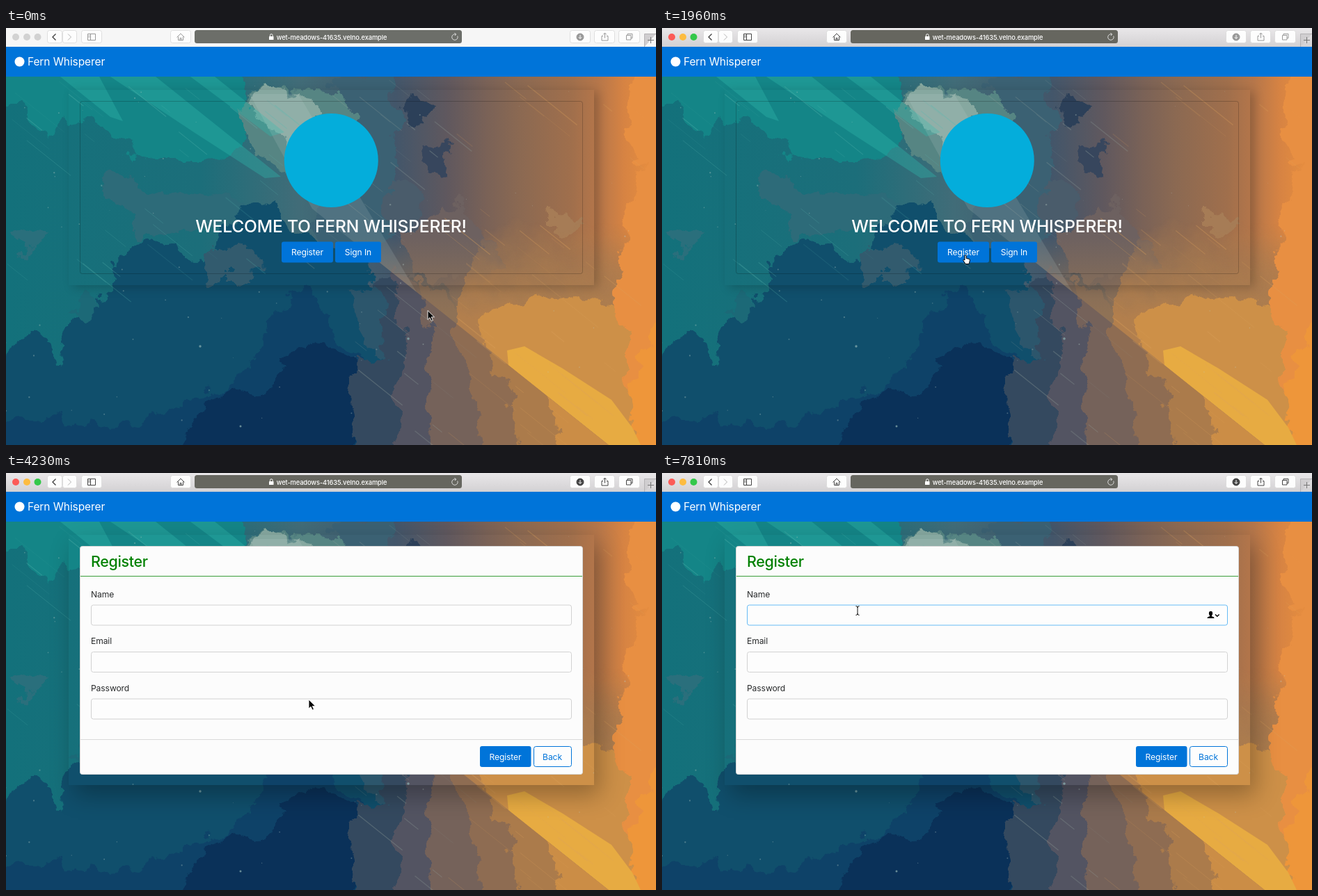
An HTML page for the animation above (8000 ms loop, 934x600 px).

```html
<!DOCTYPE html>
<html lang="en">
<head>
<meta charset="utf-8">
<title>Register</title>
<style>
html, body { margin: 0; width: 100%; height: 100%; overflow: hidden; background: #14707b; }
svg { position: absolute; left: 0; top: 0; width: 934px; height: 600px; }
#scene { will-change: transform; }
#panel { position: absolute; left: 90px; top: 89px; width: 755px; height: 281px; box-shadow: 6px 3px 14px rgba(0, 0, 0, .2); }
#panel.tall { height: 360px; box-shadow: 8px 15px 32px rgba(0, 0, 0, .28); }
text { font: 12.1px Inter, sans-serif; letter-spacing: -.1px; }
.mid { text-anchor: middle; }
.white { fill: #fff; }
.blue { fill: #0074d9; }
.field { fill: #fdfdfd; stroke: #d2d2d2; }
.key { fill: #fdfdfd; stroke: #d8d8d8; stroke-width: .8; }
.ink { fill: none; stroke: currentColor; stroke-width: 1; }
</style>
</head>
<body>
<svg id="scene" viewBox="0 0 934 600">
  <defs>
    <linearGradient id="sky">
      <stop offset="0" stop-color="#13717b"/>
      <stop offset=".3" stop-color="#1c6e7a"/>
      <stop offset=".45" stop-color="#416c78"/>
      <stop offset=".6" stop-color="#43566a"/>
      <stop offset=".68" stop-color="#60585e"/>
      <stop offset=".74" stop-color="#7a6257"/>
      <stop offset=".79" stop-color="#8b6952"/>
      <stop offset=".87" stop-color="#a06f4c"/>
      <stop offset=".91" stop-color="#b5764a"/>
      <stop offset=".95" stop-color="#d68343"/>
      <stop offset="1" stop-color="#ea903e"/>
    </linearGradient>
    <linearGradient id="dusk" gradientUnits="userSpaceOnUse" x1="0" y1="300" x2="0" y2="410">
      <stop offset="0" stop-color="#8f7256" stop-opacity="0"/>
      <stop offset="1" stop-color="#8f7256"/>
    </linearGradient>
    <linearGradient id="sand" gradientUnits="userSpaceOnUse" x1="0" y1="280" x2="0" y2="420">
      <stop offset="0" stop-color="#b27f4d" stop-opacity="0"/>
      <stop offset="1" stop-color="#b27f4d"/>
    </linearGradient>
    <clipPath id="above"><polygon points="490,300 540,340 866,600 990,699 990,20 490,20"/></clipPath>
    <filter id="rough" filterUnits="userSpaceOnUse" x="-40" y="20" width="1014" height="630" color-interpolation-filters="sRGB">
      <feTurbulence type="fractalNoise" baseFrequency=".028" numOctaves="5" seed="4"/>
      <feDisplacementMap in="SourceGraphic" scale="48" xChannelSelector="R" yChannelSelector="G"/>
    </filter>
  </defs>
  <rect width="934" height="600" fill="url(#sky)"/>
  <g filter="url(#rough)">
    <polygon fill="#148587" points="-40,20 350,20 345,110 330,180 280,195 210,195 160,165 120,130 60,150 20,110 -40,110"/>
    <polygon fill="#2a6f7c" points="8,300 30,290 50,305 35,325 15,318"/>
    <polygon fill="#2d6b79" points="135,210 170,205 200,235 260,230 330,240 360,260 330,290 250,290 200,305 180,275 145,240"/>
    <polygon fill="#3b6173" points="470,60 550,65 570,130 550,210 580,250 560,300 480,330 430,290 500,200"/>
    <polygon fill="#568583" points="330,120 345,100 375,86 440,88 490,110 500,160 480,230 430,220 380,190 340,165"/>
    <polygon fill="#86a8a0" points="345,108 375,86 425,92 450,125 412,168 392,155"/>
    <polygon fill="#2c4059" points="568,112 588,100 612,112 606,136 582,138"/>
    <polygon fill="#37465d" points="596,175 620,160 642,180 632,205 604,202"/>
    <polygon fill="#4a5c6b" points="545,240 580,215 600,245 585,290 555,295"/>
    <polygon fill="#6d6160" points="570,300 640,250 680,290 720,345 600,365"/>
    <polygon fill="#a67c56" points="785,268 812,255 830,285 805,302 785,292"/>
    <polygon fill="#104f6c" points="-40,500 10,465 35,440 80,485 95,400 140,410 150,370 165,322 215,305 240,318 300,345 330,255 380,250 420,300 500,330 560,390 600,470 590,640 -40,640"/>
    <polygon fill="#1c6977" points="85,402 110,388 142,397 140,412 100,413"/>
    <polygon fill="#325b6e" points="285,330 340,310 375,335 350,360 295,360"/>
    <polygon fill="#0e4268" points="-40,570 60,560 130,580 180,570 260,540 350,500 365,460 405,385 445,365 465,430 515,490 510,640 -40,640"/>
    <polygon fill="#0a3159" points="220,640 265,560 310,520 370,525 405,470 455,445 500,490 515,540 475,640"/>
    <polygon fill="#2c566c" points="495,370 545,372 590,440 560,480 520,465"/>
    <polygon fill="#34495f" points="500,480 540,470 545,360 600,360 960,640 510,640 495,560"/>
    <polygon fill="#535462" points="555,345 575,470 555,530 575,640 960,640"/>
    <polygon fill="#75625a" points="590,360 615,470 600,540 625,640 960,640"/>
    <polygon fill="#8e6c52" points="640,400 665,500 685,640 960,640"/>
    <polygon fill="#ab7b4b" points="690,440 725,540 740,640 960,640"/>
    <polygon fill="#cb8d46" points="750,490 785,560 800,640 960,640"/>
  </g>
  <g clip-path="url(#above)">
    <rect x="490" y="300" width="444" height="300" fill="url(#dusk)"/>
    <g filter="url(#rough)">
      <polygon fill="url(#sand)" points="640,440 660,385 690,280 990,280 990,640 860,640"/>
      <polygon fill="#cd9048" points="695,490 680,418 730,395 800,385 870,395 960,420 960,640 860,640"/>
      <polygon fill="#e88f42" points="905,20 893,130 910,200 890,270 880,340 868,380 890,430 890,500 920,560 930,640 990,640 990,20"/>
      <polygon fill="#ee963a" points="934,420 915,480 900,540 880,640 990,640 990,400"/>
    </g>
    <polygon fill="#e7ab42" points="720,464 745,458 800,490 870,535 900,575 912,600 866,600 722,485"/>
  </g>
  <g fill="#2fb5aa" opacity=".38">
    <polygon points="78,70 134,70 168,134 150,128"/>
    <polygon points="150,70 215,70 395,214 372,216 270,150"/>
    <polygon points="265,70 300,70 400,150 380,156"/>
  </g>
  <polygon fill="#c9dcd0" opacity=".14" points="350,95 420,95 590,380 540,340 440,260"/>
  <g id="grain"></g>
</svg>

<div id="panel"></div>

<svg viewBox="0 0 934 600">
  <defs>
    <linearGradient id="bar" x2="0" y2="1">
      <stop offset="0" stop-color="#e9e7e9"/>
      <stop offset="1" stop-color="#d3d1d3"/>
    </linearGradient>
  </defs>

  <!-- browser bar -->
  <rect id="top" width="934" height="27"/>
  <g id="lights"><circle cx="14" cy="13" r="5"/><circle cx="30" cy="13" r="5"/><circle cx="45.500" cy="13" r="5"/></g>
  <g id="keys"></g>
  <path d="M917.500 27V8.500H934" fill="#d0ced0" stroke="#b4b2b4"/>
  <path d="M922 17.500h9M926.500 13v9" stroke="#777"/>
  <path d="M71.500 8.500 67 13l4.500 4.500" fill="none" stroke="#444" stroke-width="1.400"/>
  <path d="M89 8.500 93.500 13 89 17.500" fill="none" stroke="#b5b5b5"/>
  <g id="left" class="ink">
    <path d="M117.500 8.500h11v9h-11zM121.500 8.500v9M118.500 11h2M118.500 13h2"/>
    <path d="M245.500 13.500 251 8l5.500 5.500M247.500 12.500v5h7v-5M250 17.500v-3h2v3"/>
  </g>
  <g id="right" class="ink">
    <circle cx="825" cy="13" r="5" fill="currentColor"/>
    <path d="M825 10v5M822.800 13.200 825 15.500l2.200-2.300" style="stroke:#fff"/>
    <path d="M858 11.500h-2v6.500h9v-6.500h-2M860.500 14.500V7.500M858 9.500l2.500-2.500 2.500 2.500"/>
    <path d="M893 10.500V8.500h7v6h-2M891.500 10.500h6.500v6.500h-6.500z"/>
  </g>
  <rect id="address" x="271" y="3" width="384" height="19" rx="3.500"/>
  <rect x="378" y="12" width="6.500" height="5" rx=".6" class="white"/>
  <path d="M379.500 12v-1.500a1.800 1.800 0 0 1 3.600 0V12" fill="none" stroke="#fff"/>
  <text x="468" y="16.500" class="mid white" style="font-size:9.300px;font-weight:500">wet-meadows-41635.velno.example</text>
  <path d="M648.800 11.500a4.200 4.200 0 1 1-2.600-2.400M644.500 7.300l2.400 1.800-2 2" fill="none" stroke="#ddd"/>

  <!-- site header -->
  <rect y="27" width="934" height="43" class="blue"/>
  <circle cx="19.500" cy="48.500" r="7" class="white"/>
  <text x="31" y="54" class="white" style="font-size:15.500px">Fern Whisperer</text>

  <g id="welcome">
    <rect x="106.500" y="105.500" width="722" height="248" rx="3" fill="none" stroke="#000" stroke-opacity=".2"/>
    <circle cx="467.300" cy="190.500" r="67.500" fill="#04addb"/>
    <text x="467" y="293.500" class="mid white" style="font-size:24.600px;font-weight:450;letter-spacing:-.2px">WELCOME TO FERN WHISPERER!</text>
    <rect id="join" x="396" y="307.500" width="74" height="30" rx="3"/>
    <rect x="473" y="307.500" width="66" height="30" rx="3" class="blue"/>
    <text x="433" y="327" class="mid white">Register</text>
    <text x="506" y="327" class="mid white">Sign In</text>
  </g>

  <g id="form">
    <rect x="106.500" y="105.500" width="722" height="328" rx="3" fill="#fcfcfc" stroke="#d6d6d6"/>
    <path d="M107 148.500H828" stroke="#3a9d3a"/>
    <path d="M107 383.500H828" stroke="#d9d9d9"/>
    <text x="122" y="134.500" fill="#008000" style="font-size:21.400px;font-weight:500;letter-spacing:-.3px">Register</text>
    <g fill="#292b2c">
      <text x="122" y="178.500">Name</text>
      <text x="122" y="246">Email</text>
      <text x="122" y="313.500">Password</text>
    </g>
    <rect id="name" class="field" x="122.500" y="190" width="690" height="29" rx="3"/>
    <rect class="field" x="122.500" y="257.500" width="690" height="29" rx="3"/>
    <rect class="field" x="122.500" y="325" width="690" height="29" rx="3"/>
    <rect x="681" y="393" width="73.500" height="30" rx="3" class="blue"/>
    <rect x="758.500" y="393.500" width="54" height="29" rx="3" fill="#fdfdfd" stroke="#0074d9"/>
    <text x="717.500" y="412.500" class="mid white">Register</text>
    <text x="785" y="412.500" class="mid blue">Back</text>
    <path id="caret" d="M133.500 196.500V212" stroke="#222"/>
    <g id="fill">
      <ellipse cx="788.500" cy="202" rx="2.600" ry="3.200"/>
      <path d="M783.500 209q0-2 3.500-2.700V204h3v2.300q3.500.7 3.500 2.700z"/>
      <path d="M795 203.500l2.800 2.800 2.800-2.800" fill="none" stroke="#000" stroke-width="1.400"/>
    </g>
  </g>

  <g id="cursor">
    <path id="arrow" d="M0 0V13L3 10.200 5.200 15 7.400 14 5.300 9.400H9.500Z" stroke="#fff" stroke-width=".9"/>
    <path id="hand" d="M-1 8V1.800a1.100 1.100 0 0 1 2.200 0V5.500l4 .8q1.300.4 1.200 1.800l-.6 3-1 2.400H.2L-3.100 8.600q-.5-1.200.6-1.400z" fill="#fff" stroke="#000"/>
    <path id="beam" d="M-2.500-6.500Q0-6.500 0-4.500 0-6.500 2.500-6.500M0-5V5M-2.500 6.500Q0 6.500 0 4.500 0 6.500 2.500 6.500" fill="none" stroke="#111"/>
  </g>
</svg>

<script>
const $ = id => document.getElementById(id);
const show = (id, on) => { $(id).style.display = on ? '' : 'none'; };

$('keys').innerHTML = [[59, 22], [81, 21], [108, 30], [236, 30], [810, 30], [845, 30], [880, 31]]
  .map(([x, w]) => `<rect class="key" x="${x}.5" y="3.500" width="${w - 1}" height="18" rx="3"/>`).join('');

// Diagonal scratches and dust over the wallpaper
let seed = 7;
const rnd = () => (seed = seed * 16807 % 2147483647) / 2147483647;
let grain = '';
for (let i = 0; i < 210; i++) {
  const x = rnd() * 900, y = 72 + rnd() * 520, len = 12 + rnd() * rnd() * 90;
  const deep = x < 500 && y > 340;
  if (i % 3 === 0) {
    grain += `<circle cx="${x}" cy="${y}" r="${.4 + rnd() * .8}" fill="#bcd0c8" opacity=".35"/>`;
  } else if (!deep) {
    const color = x < 420 ? '#5cb8b0' : x < 620 ? '#93a29c' : '#dda25c';
    grain += `<path d="M${x} ${y}l${len} ${len * .8}" stroke="${color}" stroke-width="${.5 + rnd()}" opacity="${.12 + rnd() * .25}"/>`;
  }
}
grain += '<g fill="#8fb3b4" opacity=".7"><circle cx="279" cy="458" r="1.700"/><circle cx="578" cy="447" r="1.800"/><circle cx="337" cy="573" r="1.500"/></g>';
$('grain').innerHTML = grain;

// time, x, y, pointer shape
const moves = [
  [0, 606, 406.5, 'arrow'], [600, 542, 385, 'arrow'], [770, 490, 374, 'arrow'],
  [920, 472, 367, 'arrow'], [1070, 454, 351, 'arrow'], [1220, 442, 336, 'arrow'],
  [1360, 438, 330, 'arrow'], [1510, 435, 326, 'arrow'], [1810, 436, 326, 'hand'],
  [3780, 435, 326, 'arrow'], [4680, 326, 252, 'arrow'], [4830, 281, 199, 'beam'],
  [4980, 281, 198, 'beam']
];
const blinks = [5270, 5870, 6310, 6760, 7360, 7810];

function draw() {
  const t = performance.now() % 8000;
  const [, x, y, shape] = moves.filter(m => m[0] <= t).pop();
  $('cursor').setAttribute('transform', `translate(${x} ${y})`);
  for (const id of ['arrow', 'hand', 'beam']) show(id, id === shape);

  const active = t >= 1960, form = t >= 4230;
  const lights = active ? ['#fc5b57', '#fdbc40', '#34c84a'] : ['#d2d2d2', '#d2d2d2', '#d2d2d2'];
  [...$('lights').children].forEach((c, i) => c.setAttribute('fill', lights[i]));
  $('top').setAttribute('fill', active ? 'url(#bar)' : '#f6f6f6');
  $('address').setAttribute('fill', active ? '#66665f' : '#6c6e69');
  $('left').style.color = active ? '#444' : '#999';
  $('right').style.color = t >= 2110 ? '#444' : '#999';

  show('welcome', !form);
  show('form', form);
  $('panel').className = form ? 'tall' : '';
  $('join').setAttribute('fill', t >= 2110 ? '#0259a6' : '#0074d9');
  $('name').style.stroke = t >= 5420 ? '#66bbf5' : '';
  show('fill', t >= 5270);
  show('caret', blinks.filter(b => b <= t).length % 2);
  requestAnimationFrame(draw);
}
draw();
</script>
</body>
</html>
```
